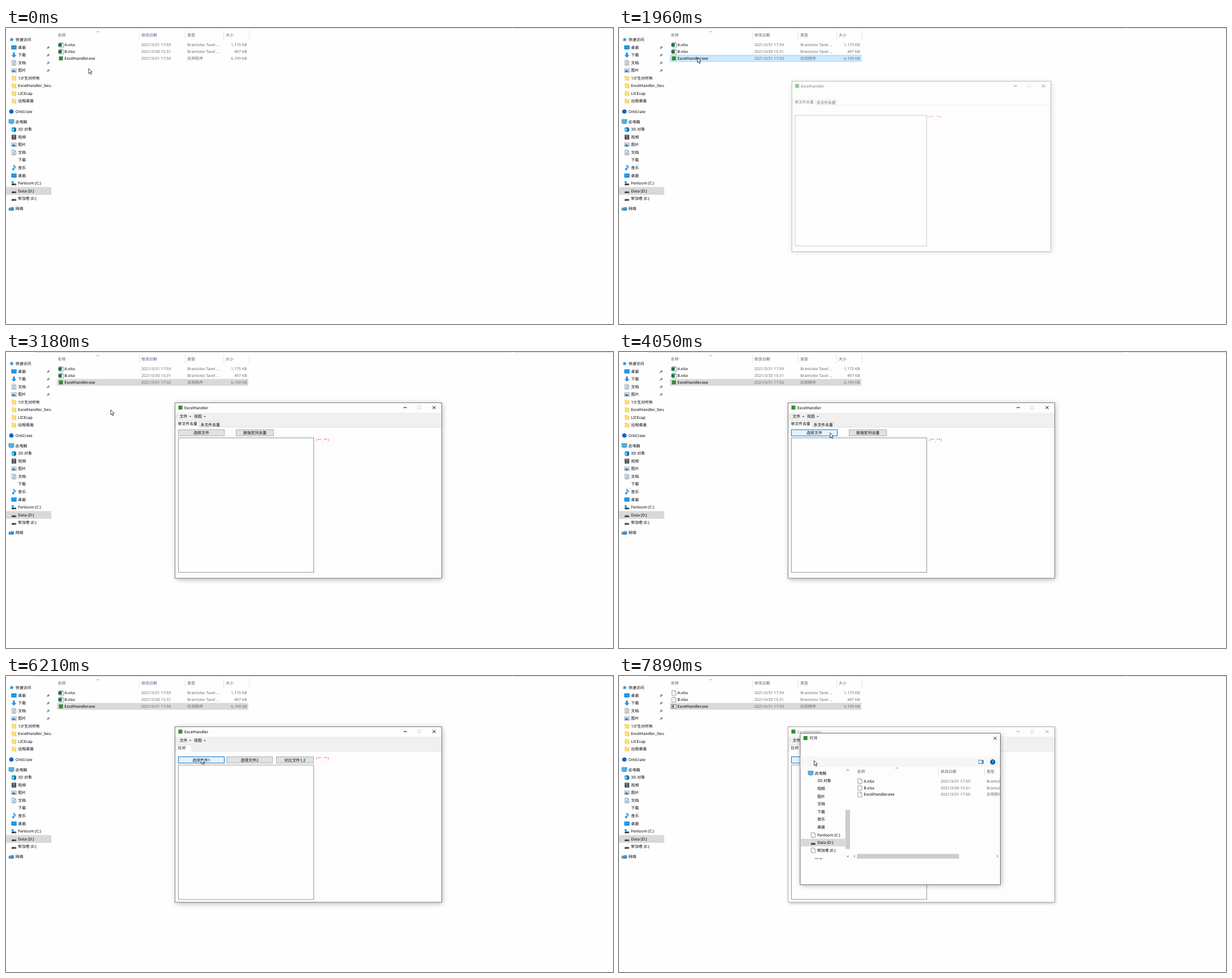
Animation of 1072 by 522 pixels, one loop 8 s. Source, as an HTML page with a canvas:

```html
<!DOCTYPE html>
<html lang="zh-CN">
<head>
<meta charset="utf-8">
<title>ExcelHandler</title>
<style>
html, body { margin: 0; width: 100%; height: 100%; overflow: hidden; background: #fefefe; }
canvas { display: block; }
</style>
</head>
<body>
<canvas id="stage" width="1072" height="522"></canvas>
<script>
const W = 1072, H = 522, LOOP = 8000;
const SANS = '"Noto Sans", "Noto Sans CJK SC", "Noto Sans CJK JP", sans-serif';
const MONO = '"DejaVu Sans Mono", "Liberation Mono", monospace';
const GREEN = '#2f8f2f', BLUE = '#1b8fe0', GREY = '#6d6d6d', HEAD = '#4c607a';

const main = document.getElementById('stage').getContext('2d');
const layerCanvas = document.createElement('canvas');
layerCanvas.width = W;
layerCanvas.height = H;
const layer = layerCanvas.getContext('2d');
let g = main;

// ---- basic drawing ----
function box(x, y, w, h, fill, stroke, lw = 1) {
  if (fill) { g.fillStyle = fill; g.fillRect(x, y, w, h); }
  if (stroke) { g.strokeStyle = stroke; g.lineWidth = lw; g.strokeRect(x, y, w, h); }
}

function path(points, fill, stroke, lw = 1) {
  g.beginPath();
  points.forEach(([x, y], i) => i ? g.lineTo(x, y) : g.moveTo(x, y));
  if (fill) { g.closePath(); g.fillStyle = fill; g.fill(); }
  if (stroke) { g.strokeStyle = stroke; g.lineWidth = lw; g.stroke(); }
}

function disc(x, y, r, fill) {
  g.beginPath();
  g.arc(x, y, r, 0, Math.PI * 2);
  g.fillStyle = fill;
  g.fill();
}

function text(s, x, y, color = '#000', align = 'left', size = 6.9, family = SANS) {
  g.font = size + 'px ' + family;
  g.textAlign = align;
  g.fillStyle = color;
  g.fillText(s, x, y + size * 0.36);
}

function clipped(x, y, w, h, draw) {
  g.save();
  g.beginPath();
  g.rect(x, y, w, h);
  g.clip();
  draw();
  g.restore();
}

const chevron = (x, y, dx, dy, color = '#555') =>
  path(dx ? [[x - dx, y - 2], [x + dx, y], [x - dx, y + 2]]
          : [[x - 2, y - dy], [x, y + dy], [x + 2, y - dy]], null, color, 0.9);

const cross = (x, y, r, color) => {
  path([[x - r, y - r], [x + r, y + r]], null, color, 0.9);
  path([[x + r, y - r], [x - r, y + r]], null, color, 0.9);
};

const mark = (x, y) => box(x - 3.5, y - 3.5, 7, 7, GREEN);

// ---- icons, centred on x, y ----
const icon = {
  none() {},
  star(x, y) {
    const pts = [];
    for (let i = 0; i < 10; i++) {
      const a = i * Math.PI / 5 - 1.3, r = i % 2 ? 1.8 : 4.2;
      pts.push([x + r * Math.cos(a), y + r * Math.sin(a)]);
    }
    path(pts, BLUE);
  },
  desk(x, y) {
    box(x - 4.5, y - 3.5, 9, 7, '#0f7fd0');
    box(x - 4.5, y - 3.5, 9, 5.5, '#199bf0');
  },
  down(x, y) {
    path([[x - 1.7, y - 4.5], [x + 1.7, y - 4.5], [x + 1.7, y], [x + 4.5, y],
          [x, y + 4.5], [x - 4.5, y], [x - 1.7, y]], '#2a8be0');
  },
  page(x, y) {
    path([[x - 3.5, y - 4.3], [x + 1.3, y - 4.3], [x + 3.5, y - 2], [x + 3.5, y + 4.3],
          [x - 3.5, y + 4.3], [x - 3.5, y - 4.3]], '#fff', '#858585', 0.8);
    path([[x + 1.3, y - 4.3], [x + 1.3, y - 2], [x + 3.5, y - 2]], null, '#858585', 0.7);
  },
  doc(x, y) {
    icon.page(x, y);
    for (let i = -1; i < 3; i++) box(x - 2, y + i * 1.6 - 0.6, 4, 0.8, '#5b92bd');
  },
  pic(x, y) {
    box(x - 4.2, y - 3.2, 8.4, 6.4, '#f4f8fb', '#8a949c', 0.8);
    box(x - 3.2, y - 2.2, 6.4, 4.4, '#a6d4f3');
    path([[x - 3.2, y + 2.2], [x - 3.2, y], [x - 0.5, y - 0.6], [x + 3.2, y + 1.4], [x + 3.2, y + 2.2]], '#33658b');
  },
  folder(x, y) {
    box(x - 4, y - 4.2, 4, 2, '#eabf50');
    box(x - 4, y - 3.3, 8, 7.6, '#ffdc7c');
    box(x + 2.8, y - 3.3, 1.2, 7.6, '#f0c860');
  },
  cloud(x, y) { disc(x, y, 3.8, '#0a66bd'); },
  pc(x, y) {
    box(x - 4.4, y - 3.8, 8.8, 5.8, '#4bb8f2', '#3a7ca8', 0.8);
    box(x - 3, y + 3, 6, 1, '#5a7f99');
  },
  cube(x, y) {
    path([[x - 4, y - 3], [x, y - 4.4], [x + 4, y - 3], [x + 4, y + 3], [x, y + 4.4], [x - 4, y + 3]], '#16a5d8');
    path([[x, y - 1.5], [x + 4, y - 3], [x + 4, y + 3], [x, y + 4.4]], '#0b77ab');
    path([[x - 2.5, y - 1.6], [x - 0.4, y - 1], [x - 0.4, y + 2.3], [x - 2.5, y + 1.6]], '#c8f1ff');
  },
  film(x, y) {
    box(x - 4, y - 4.2, 8, 8.4, '#3b3f48');
    box(x - 2.4, y - 3.4, 4.8, 3, '#7489a8');
    box(x - 2.4, y + 0.5, 4.8, 3, '#7c6f68');
  },
  note(x, y) {
    disc(x - 1.3, y + 2.6, 1.9, '#1a8ee8');
    path([[x, y + 2.6], [x, y - 4.3], [x + 3, y - 1], [x + 2.3, y + 1]], null, '#1a8ee8', 1.3);
  },
  drive(x, y) {
    path([[x - 4, y + 1.5], [x - 3, y], [x + 3, y], [x + 4, y + 1.5]], '#a5a5a5');
    box(x - 4, y + 1.2, 8, 2.4, '#333');
    box(x + 1.8, y + 2, 1.2, 0.8, '#8fd08f');
  },
  sysDrive(x, y) {
    icon.drive(x, y);
    box(x - 4, y - 3.5, 3.6, 3.6, '#19a0e8');
  },
  net(x, y) {
    box(x - 4.4, y - 1.6, 6, 4.2, '#4fa8dc', '#466c86', 0.7);
    disc(x + 1.5, y, 3.3, '#2b86c4');
    path([[x - 1, y + 1], [x + 1.5, y - 2.5], [x + 3.5, y]], null, '#8ed0f2', 0.8);
  },
  sheet(x, y) {
    icon.page(x + 1.2, y);
    box(x - 4.5, y - 3, 6, 6, '#1d7044');
  },
  app: mark,
  exe(x, y) {
    box(x - 4, y - 3.2, 8, 6.4, '#fff', '#555', 0.8);
    box(x - 3, y - 1.8, 3.4, 3.6, '#1d6fb5');
  }
};

function pin(x, y) {
  path([[x + 0.3, y - 3], [x + 3, y - 0.3], [x + 1.6, y], [x + 0.2, y + 2.2], [x - 2.2, y - 0.2], [x, y - 1.6]], '#7b858c');
  path([[x - 2.8, y + 2.8], [x - 0.6, y + 0.6]], null, '#7b858c', 0.9);
}

// ---- file explorer ----
const places = [
  ['star', 10, 20.5, '快速访问'], ['desk', 14, 34.2, '桌面'], ['down', 14, 47.7, '下载'],
  ['doc', 14, 61.3, '文档'], ['pic', 14, 75, '图片'], ['folder', 14, 88.5, '1计生对所有'],
  ['folder', 14, 102, 'ExcelHandler_Security'], ['folder', 14, 115.5, 'LICEcap'],
  ['folder', 14, 129, '远程桌面'], ['cloud', 9.5, 147.3, 'OrbCrate'], ['pc', 9.5, 165.3, '此电脑'],
  ['cube', 14, 179, '3D 对象'], ['film', 14, 192.5, '视频'], ['pic', 14, 206, '图片'],
  ['doc', 14, 219.6, '文档'], ['none', 14, 233, '下载'], ['note', 14, 246.5, '音乐'],
  ['desk', 14, 260.2, '桌面'], ['sysDrive', 14, 273.7, 'Fenloom (C:)'], ['drive', 14, 287.5, 'Data (D:)'],
  ['drive', 14, 301, '新加卷 (E:)'], ['net', 9.5, 319, '网络']
];
const TYPE = 'Brantolex Tavel ...';
const files = [
  ['A.xlsx', '2021/3/31 17:59', TYPE, '1,175 KB', 'sheet'],
  ['B.xlsx', '2021/3/30 15:31', TYPE, '497 KB', 'sheet'],
  ['ExcelHandler.exe', '2021/3/31 17:50', '应用程序', '6,199 KB', 'app']
];

function explorer(t) {
  box(0, 0, W, H, '#fefefe');
  box(51, 0, 841, 1, '#d8d8d8');
  box(897, 0, 175, 1, '#d8d8d8');
  box(0, 280.5, 80, 13.7, '#d9d9d9');
  clipped(0, 0, 80, H, () => places.forEach(([kind, x, y, label]) => {
    icon[kind](x, y);
    text(label, x < 13 ? 16.8 : 21.3, y);
  }));
  [34.5, 48, 61.5, 75].forEach(y => pin(74.5, y));

  [['名称', 91.5], ['修改日期', 239], ['类型', 320.3], ['大小', 388]].forEach(([s, x]) => text(s, x, 12.8, HEAD));
  [235, 316, 384, 429].forEach(x => box(x, 4, 1, 16, '#e5e5e5'));
  chevron(162, 6.5, 0, -1, '#777');

  rowState(t);
  const late = t >= 7890;
  files.forEach(([name, date, type, size, kind], i) => {
    const y = 29.8 + i * 11.9;
    icon[late ? (i < 2 ? 'page' : 'exe') : kind](97, y);
    text(name, 103.3, y);
    text(date, 239, y, GREY);
    text(type, 320.3, y, GREY);
    text(size, 425.5, y, GREY, 'right');
  });
}

function rowState(t) {
  if (t < 260) return;
  const colors = t < 840 ? ['#e5f3ff'] : t < 970 ? ['#cce8ff'] : t < 2910 ? ['#cce8ff', '#99d1ff'] : ['#d9d9d9'];
  box(90, 47.5, 338, 12, colors[0]);
  if (colors[1]) box(90.5, 48, 337, 11, null, colors[1], 0.8);
}

// ---- application window ----
function button(x, y, w, label, state) {
  const [fill, edge] = { hot: ['#e5f1fb', '#0078d7'], down: ['#cce4f7', '#005499'] }[state] || ['#e1e1e1', '#adadad'];
  box(x, y, w, 11, fill, edge);
  text(label, x + w / 2, y + 5.7, '#000', 'center');
}

function frame(x, y, w, h, edge, blur, alpha) {
  g.save();
  g.shadowColor = `rgba(0,0,0,${alpha})`;
  g.shadowBlur = blur;
  g.shadowOffsetX = 1;
  g.shadowOffsetY = 1.5;
  box(x, y, w, h, '#fdfdfd');
  g.restore();
  box(x, y, w, h, null, edge);
}

function tab(x, y, w, label, active) {
  box(x, y, w, 132.5 - y + (active ? 0.8 : 0), active ? '#fdfdfd' : '#f0f0f0');
  path([[x, 132.5], [x, y], [x + w, y], [x + w, 132.5]], null, '#dcdcdc', 0.8);
  text(label, x + (active ? 3 : 1.5), active ? 126.8 : 128.2);
}

function appWindow(t, bare) {
  const active = t < 6760, compare = t >= 5570;
  frame(298.5, 89.5, 471, 309.5, active ? '#7c7c7c' : '#a5a5a5', active ? 9 : 5, active ? 0.3 : 0.25);
  mark(308, 98);
  const ink = active ? '#000' : '#999';
  text('ExcelHandler', 315, 98.3, ink);
  path([[702, 98], [708, 98]], null, ink);
  box(727.5, 95.5, 5, 5, null, '#ccc', 0.8);
  cross(756, 98, 2.7, ink);

  if (!bare) {
    box(299, 107, 470, 25.5, '#f0f0f0');
    for (let y = 110; y < 118; y += 2) box(301, y, 0.8, 0.8, '#aaa');
    const open = t >= 4740 && t < 5570;
    if (t >= 4460 && t < 5570) box(330.5, 107.5, 24, 12, open ? '#fdfdfd' : '#b3d7f3', open ? '#999' : '#0078d7', 0.8);
    text('文件', 306.5, 113.8);
    text('视图', 332, 113.8);
    [325.5, 351].forEach(x => path([[x - 1.7, 113], [x + 1.7, 113], [x, 114.8]], '#222'));
  }
  path([[299, 132.5], [769, 132.5]], null, '#dcdcdc', 0.8);

  const dy = compare ? 5.5 : 0;
  if (compare) {
    tab(300.5, 121.5, 27.5, '比对', true);
    const state = t < 6090 ? '' : t >= 6490 && t < 6620 ? 'down' : 'hot';
    button(304.5, 142.5, 81, '选择文件1', state);
    button(390, 142.5, 80.5, '选择文件2');
    button(477.5, 142.5, 65.5, '对比文件1,2');
  } else {
    tab(342, 122.8, 38, '多文件去重', false);
    tab(300.5, 121.5, 40.5, '单文件去重', true);
    if (!bare) {
      button(304.5, 137, 81, '选择文件', t >= 4050 && t < 4190 ? 'hot' : '');
      button(406.5, 137, 66, '按指定列去重');
    }
  }
  box(304.5, 151.5 + dy, 239, 237, '#fefefe', '#8c8c8c', 0.9);
  text('(*^_^*)', 547, compare ? 145.3 : 154.8, '#f00', 'left', 5.7, MONO);
  if (t >= 4740 && t < 5570) viewMenu(t);
}

function viewMenu(t) {
  box(331.5, 119.5, 53, 27.5, '#fdfdfd', '#999', 0.8);
  box(332, 120, 13, 26.5, '#f1f1f1');
  ['去重', '比对'].forEach((s, i) => {
    const y = 120.5 + i * 13;
    if (t >= (i ? 5290 : 5020) && (i || t < 5290)) box(332.5, y, 51, 12.5, '#b3d7f3', '#0078d7', 0.8);
    text(s, 349, y + 6.4);
  });
}

// ---- open-file dialog ----
function dialog(bare) {
  frame(320, 101, 353.5, 267, '#6e6e6e', bare ? 6 : 9, 0.3);
  mark(329.3, 109.5);
  cross(664.3, 109.8, 2.7, '#000');
  chevron(404, 166, 0, -1.1);
  chevron(404, 318, 0, 1.1);
  box(420.3, 313.7, 180.3, 8.3, '#cdcdcd');
  if (bare) {
    box(399.8, 170, 8.2, 122, '#cdcdcd');
    return;
  }
  text('打开', 336.8, 109.8);
  box(320.5, 142.5, 352.5, 18, '#f5f6f7');
  box(635.5, 148.5, 8, 6, '#fff', '#4a6377', 0.8);
  box(640.5, 149, 2.7, 5, '#3f9bdc');
  disc(660, 151.7, 4.6, '#0063b1');
  text('?', 660, 151.8, '#fff', 'center', 7);

  box(399.8, 236, 8.2, 69, '#cdcdcd');
  chevron(415.7, 317.8, -1.1, 0);
  chevron(668.5, 317.8, 1.1, 0);
  box(320.5, 287, 79, 13.5, '#d9d9d9');
  clipped(320, 161, 80, 162, () => {
    icon.pc(338.5, 171.5);
    text('此电脑', 345.8, 171.8);
    ['3D 对象', '视频', '图片', '文档', '下载', '音乐', '桌面', 'Fenloom (C:)', 'Data (D:)', '新加卷 (E:)'].forEach((s, i) => {
      const y = 185 + i * 13.6;
      if (i > 6) icon[i === 8 ? 'drive' : 'page'](343, y);
      text(s, 350.2, y);
    });
    text('网络', 345.8, 325);
  });
  clipped(409, 161, 264, 60, () => {
    [['名称', 420.5], ['修改日期', 568], ['类型', 649.3]].forEach(([s, x]) => text(s, x, 168.3, HEAD));
    [564, 645].forEach(x => box(x, 161, 1, 15, '#e5e5e5'));
    chevron(490.7, 162.5, 0, -1, '#777');
    files.forEach(([name, date, type], i) => {
      const y = 185.2 + i * 11.9;
      icon.page(425.5, y);
      text(name, 432.3, y);
      text(date, 568, y, GREY);
      text(type, 649.3, y, GREY);
    });
  });
}

// ---- motion ----
function fade(alpha, scale, cx, cy, draw) {
  if (alpha === 1) { draw(); return; }
  layer.clearRect(0, 0, W, H);
  layer.save();
  layer.translate(cx, cy);
  layer.scale(scale, scale);
  layer.translate(-cx, -cy);
  g = layer;
  draw();
  layer.restore();
  g = main;
  g.globalAlpha = alpha;
  g.drawImage(layerCanvas, 0, 0);
  g.globalAlpha = 1;
}

// last entry whose time has passed
const at = (steps, t) => steps.reduce((cur, s) => s[0] <= t ? s : cur, null);

const appSteps = [[1840, 0.12, 0.945], [1960, 0.5, 0.971], [2080, 0.88, 0.993], [2200, 1, 1]];
const dialogSteps = [[7470, 0.5, 0.97], [7590, 0.82, 0.988], [7740, 0.97, 1], [7890, 1, 1]];
const pointer = [
  [0, 146, 71.5], [120, 144, 66], [260, 142, 59], [400, 139.5, 55], [540, 138.5, 52.5],
  [2910, 145, 66], [3050, 185, 102], [3190, 238, 144], [3330, 288, 180], [3480, 332, 198.5],
  [3620, 372, 194], [3760, 394, 182], [3900, 399, 167.5], [4050, 372.8, 142.5],
  [4190, 355, 128], [4330, 346, 119], [4460, 341, 113], [4600, 340, 111.5],
  [5020, 342, 119], [5150, 344, 128], [5290, 345, 137],
  [5970, 345, 140], [6090, 345, 144], [6210, 344.7, 146], [7890, 344.5, 149]
];

function cursor(t) {
  const [, x, y] = at(pointer, t);
  if (t >= 1400 && t < 1840) {
    g.beginPath();
    g.arc(146.5, 53.5, 3.2, 0, Math.PI * 2);
    g.strokeStyle = '#2a9fe0';
    g.lineWidth = 1.6;
    g.stroke();
  }
  path([[x, y], [x, y + 8.8], [x + 2, y + 7], [x + 3.4, y + 10.2], [x + 4.9, y + 9.5],
        [x + 3.5, y + 6.4], [x + 6.2, y + 6.2], [x, y]], '#fff', '#111', 0.8);
}

function draw(t) {
  explorer(t);
  const app = at(appSteps, t);
  if (app) fade(app[1], app[2], 534, 244.3, () => appWindow(t, app[1] < 1));
  const dlg = at(dialogSteps, t);
  if (dlg) {
    if (dlg[1] > 0.5) box(674, 107.5, 10, 24.5, '#f9f9f9');
    fade(dlg[1], dlg[2], 496.7, 234.5, () => dialog(dlg[1] < 1));
  }
  cursor(t);
}

main.textRendering = layer.textRendering = 'geometricPrecision';
const start = performance.now();
function tick() {
  draw((performance.now() - start) % LOOP);
  requestAnimationFrame(tick);
}
tick();
</script>
</body>
</html>
```
